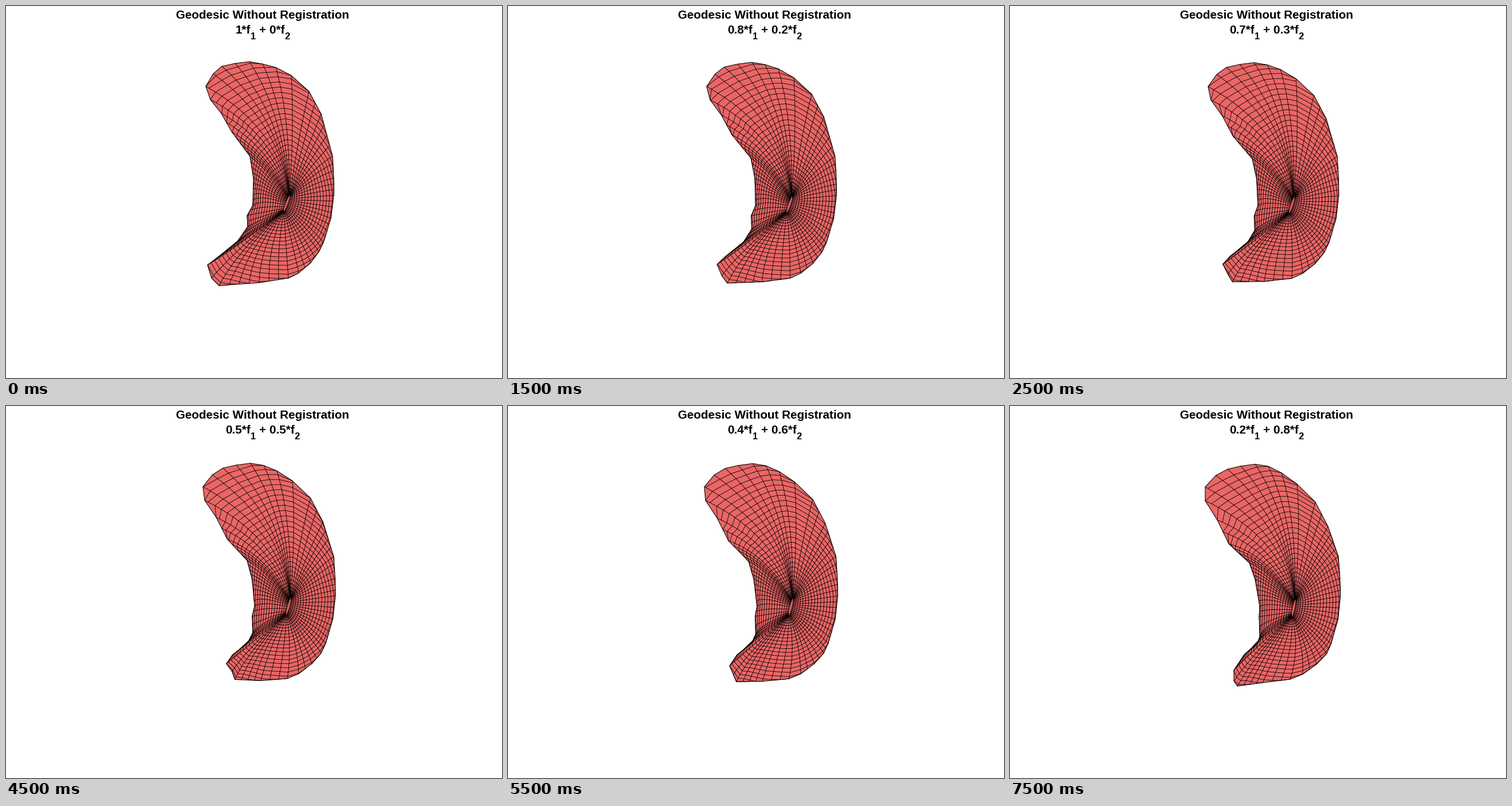
Recreate the animation shown at these times as a matplotlib script. Size 864x648 px, loop 8000 ms.

```python
import numpy as np
import matplotlib.pyplot as plt
from matplotlib.animation import FuncAnimation
from matplotlib.collections import LineCollection
from matplotlib.patches import Polygon

W, H, DPI = 864, 648, 100
FACE = "#ea6666"
MID_X = 447
SIZE, SUB = 20.6, 16.5
ADVANCE = {" ": .278, ".": .278, "*": .389, "f": .333, "+": .584}  # em; digits .556
RINGS = 30
LAST = .8

# Silhouette vertices, clockwise from the upper left tip
START = np.reshape(
    [348, 140, 361, 118, 376, 105, 399, 100, 424, 97, 447, 101, 470, 107,
     497, 121, 528, 149, 549, 188, 569, 262, 571, 300, 571, 330, 566, 370,
     553, 412, 545, 428, 531, 447, 510, 465, 492, 474, 441, 482, 371, 487,
     358, 474, 351, 451, 367, 439, 403, 410, 421, 384, 420, 365, 430, 347,
     431, 300, 425, 262, 393, 219, 375, 187, 356, 163], (-1, 2)).astype(float)

# Vertex index and its travel over the whole loop
TRAVEL = np.array([
    (0, -8, 1), (2, 3, 5), (5, 3, 4), (7, 3, 15), (9, 5, 22), (10, 3, 0),
    (15, 7, 3), (18, -4, 2), (19, -1, 0), (20, 25, 1), (22, 39, 9), (23, 41, -6),
    (25, 14, 18), (26, 14, 2), (28, -4, 2), (30, -12, 21), (32, -16, 2)])

# Vertex index and the bend point of its meridian
BENDS = np.array([
    (0, 474, 205), (4, 482, 185), (7, 500, 195), (10, 538, 280), (12, 542, 332),
    (14, 532, 385), (16, 512, 405), (18, 490, 420), (19, 440, 420), (20, 402, 424),
    (22, 398, 426), (26, 445, 362), (28, 446, 305), (30, 456, 258), (32, 468, 220)])


def around(at, knots, values):
    """Periodic linear interpolation over the vertex index."""
    return np.column_stack([np.interp(at, knots, v, period=NV) for v in values.T])


def bump(at, mid, spread):
    return np.exp(-((at - mid) / spread) ** 2)[:, None]


def smooth(values, n=2):
    for _ in range(n):
        values = (np.roll(values, 1, 0) + 2 * values + np.roll(values, -1, 0)) / 4
    return values


def place_rays():
    """Meridians lie closer together where the edge is near the pole."""
    step = np.hypot(*(np.roll(START, -1, 0) - START).T)
    gap = np.maximum(9, np.hypot(*(START - (489, 344)).T) / 8)
    counts = np.maximum(1, np.round(step / gap)).astype(int)
    return np.concatenate([i + np.arange(c) / c for i, c in enumerate(counts)])


NV = len(START)
VERTS = np.arange(NV)
RAYS = place_rays()
SHIFT = around(VERTS, TRAVEL[:, 0], TRAVEL[:, 1:])


def outline(s):
    # The lower tip retracts until half way, then a second one passes it
    tent = min(s / .5, (LAST - s) / (LAST - .5))
    return START + SHIFT * s / LAST + tent * bump(VERTS, 20.8, 1.5) * (16, -15)


def mesh(s, edge):
    t = s / LAST
    outer = around(RAYS, VERTS, edge)
    bend = around(RAYS, BENDS[:, 0], BENDS[:, 1:])
    bend += t * (np.array([4, 5]) + bump(RAYS, 20, 3.5) * (20, 4)
                 - bump(RAYS, 30, 1.5) * (12, 3))
    bend = smooth(bend)

    # Narrow tilted ellipse at the pole
    pole = np.array([489 + 5 * t, 344 + 8 * t])
    axis = np.array([8 - 4 * t, -21 + t])
    axis /= np.hypot(*axis)
    side = np.array([-axis[1], axis[0]])
    d = bend - pole
    phi = np.arctan2(d @ side, d @ axis)[:, None]
    start = pole + 16 * np.cos(phi) * axis + 2 * np.sin(phi) * side

    # Short meridians pass behind the silhouette sooner
    reach = .35 + .65 * smooth(np.hypot(*(outer - pole).T)) / 250
    v = np.linspace(0, 1, RINGS)[:, None]
    u = (v / reach) ** 1.4
    hidden = u > 1.05
    u = np.minimum(u, 1)[..., None]
    grid = (1 - u) ** 2 * start + 2 * u * (1 - u) * bend + u ** 2 * outer
    rays = [np.vstack([grid[:, j], o]) for j, o in enumerate(outer)]
    rings = np.where(hidden[..., None], np.nan, grid)
    return rays + [np.vstack([r, r[:1]]) for r in rings]


def width(text, size):
    return size * sum(ADVANCE.get(c, .556) for c in text)


fig = plt.figure(figsize=(W / DPI, H / DPI), dpi=DPI, facecolor="white")
ax = fig.add_axes([0, 0, 1, 1])
ax.set_xlim(0, W)
ax.set_ylim(H, 0)
ax.axis("off")


def label(text, x, y, size, ha="left"):
    return ax.text(x, y, text, fontsize=size * 72 / DPI, family="Liberation Sans",
                   weight="bold", ha=ha, va="baseline", color="black")


label("Geodesic Without Registration", MID_X, 22.5, SIZE, "center")
parts = [(label("", 0, 48 + 10 * (i % 2), size), size)
         for i, size in enumerate((SIZE, SUB, SIZE, SUB))]

body = ax.add_patch(Polygon(START, closed=True, facecolor=FACE,
                            edgecolor="black", linewidth=.75, joinstyle="round"))
wires = ax.add_collection(LineCollection([], colors="black", linewidths=.6),
                          autolim=False)


def draw(k):
    s = (k + 1) // 2 / 10
    edge = outline(s)
    body.set_xy(edge)
    wires.set_segments(mesh(s, edge))

    words = (f"{round(1 - s, 1):g}*f", "1", f" + {s:g}*f", "2")
    x = MID_X - sum(width(w, size) for w, (_, size) in zip(words, parts)) / 2
    for word, (text, size) in zip(words, parts):
        # Leading blanks are laid out by position
        shown = word.lstrip()
        text.set_text(shown)
        text.set_x(x + width(word[:len(word) - len(shown)], size))
        x += width(word, size)
    return [body, wires]


anim = FuncAnimation(fig, draw, frames=16, interval=500, repeat=True,
                     repeat_delay=0, blit=False)
plt.show()
```
